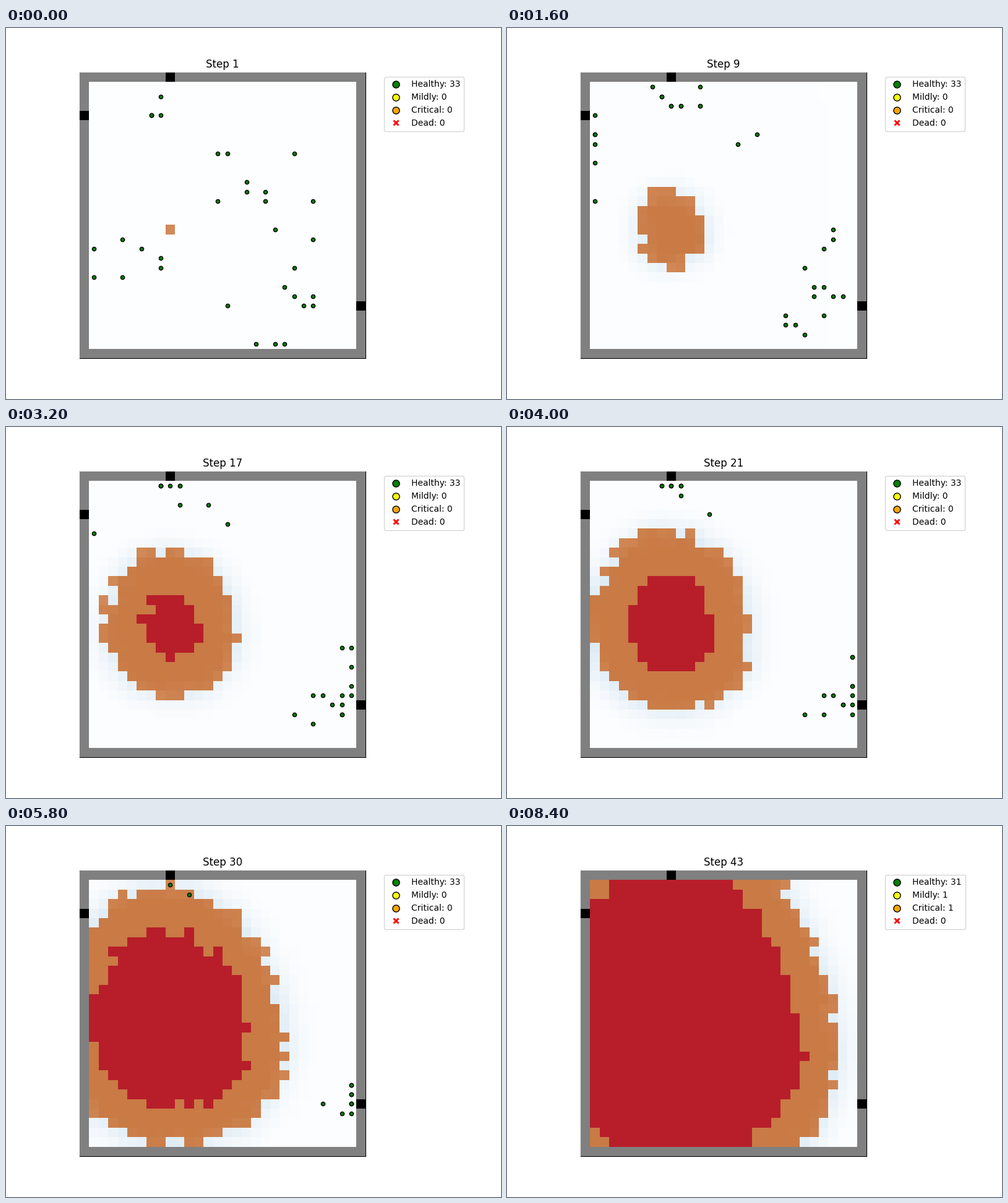
These frames come from a looping animation (800x600 px, 8.6 s). A matplotlib script:

```python
import numpy as np
import matplotlib.pyplot as plt
from matplotlib.animation import FuncAnimation
from matplotlib.lines import Line2D

STEPS, SIZE, BURN_TIME = 43, 30, 9.5
IGNITION = np.array((9, 16))
GATES = np.array([(9, 0), (0, 4), (29, 24)])
COLORS = {"Healthy": "green", "Mildly": "yellow", "Critical": "orange", "Dead": "red"}
EMBER, EMBER_EDGE, BURNT = (201, 122, 69), (210, 138, 88), (183, 30, 42)
CLEAR, SMOKE = (253, 254, 255), (208, 227, 241)

# Where people start: how many, around which cell, how widely spread.
CROWDS = [(5, (8, 3), 1.5), (10, (19, 11), 4), (7, (5, 19), 2.5), (11, (22, 24), 3.5)]

rng = np.random.default_rng(4)


def arrival_times():
    """Step at which each cell catches fire; the front's speed varies by direction."""
    rows, cols = np.mgrid[:SIZE, :SIZE]
    dx, dy = cols - IGNITION[0], rows - IGNITION[1]
    a = np.arctan2(dy, dx)
    speed = (0.428 - 0.03 * np.sin(a) - 0.029 * np.cos(2 * a + 0.5)
             + 0.017 * np.sin(3 * a))
    dist = np.hypot(dx, dy)
    ragged = rng.uniform(-1.4, 1.4, dist.shape)
    times = 1 + np.where(dist > 0, np.maximum((dist - 0.4) / speed + ragged, 1), 0)
    times[[0, -1]] = times[:, [0, -1]] = np.inf
    return times


def blur(field):
    p = np.pad(field, 1, mode="edge")
    return sum(p[i:i + SIZE, j:j + SIZE] for i in range(3) for j in range(3)) / 9


def mix(low, high, amount):
    low, high = np.array(low) / 255, np.array(high) / 255
    return low + (high - low) * np.clip(amount, 0, 1)[..., None]


def render_floors():
    """One RGB grid per step: smoke halo, burning and burnt cells, walls, gates."""
    times = arrival_times()
    grain = rng.uniform(-0.2, 0.2, times.shape)
    smoke = np.zeros_like(times)
    floors = []
    for step in range(1, STEPS + 1):
        lit, burnt = times <= step, times + BURN_TIME <= step
        floor = mix(CLEAR, SMOKE, smoke)
        floor[lit] = mix(EMBER_EDGE, EMBER, 1.5 * smoke - 0.3 + grain)[lit]
        floor[burnt] = np.array(BURNT) / 255
        floor[[0, -1]] = floor[:, [0, -1]] = 128 / 255
        floor[GATES[:, 1], GATES[:, 0]] = 0
        floors.append(floor)
        smoke[lit] = 1
        near = blur(smoke)
        smoke = (near + blur(near)) / 2
    return floors


def plan_paths():
    """Cells per step for everyone; those nearest the fire leave first."""
    starts = np.concatenate([rng.normal(c, s, (n, 2)) for n, c, s in CROWDS])
    starts = np.clip(np.rint(starts), 1, SIZE - 2)
    starts = starts[np.argsort(np.hypot(*(starts - IGNITION).T))]
    paths = []
    for start, leave in zip(starts, np.linspace(8, STEPS, len(starts))):
        gate = GATES[np.argmin(np.hypot(*(GATES - start).T))]
        u = (np.arange(1, np.ceil(leave)) - 1) / (leave - 1)
        u = u[:, None]
        sway = rng.normal(0, 1.5, 2) * np.sin(np.pi * u)
        route = start + (gate - start) * u ** 0.8 + sway
        paths.append(np.clip(np.rint(route), 1, SIZE - 2))
    return paths


def condition(person, step):
    """The last two to leave are caught by the smoke."""
    if person < len(paths) - 2 or step < 39:
        return "Healthy"
    return "Critical" if person == len(paths) - 1 and step >= 41 else "Mildly"


floors = render_floors()
paths = plan_paths()

fig, ax = plt.subplots(figsize=(8, 6), dpi=100)
fig.subplots_adjust(left=0.125, right=0.75, bottom=0.11, top=0.88)
image = ax.imshow(floors[0], interpolation="nearest", zorder=3)
dots = {name: ax.scatter([], [], s=20, c=color, edgecolors="black", linewidths=1, zorder=4)
        for name, color in COLORS.items() if name != "Dead"}
ax.set(xticks=[], yticks=[])
title = ax.set_title("Step 1")

handles = [
    Line2D([0], [0], marker="X" if name == "Dead" else "o", color="w", markersize=8,
           markerfacecolor=color, markeredgecolor="w" if name == "Dead" else "black",
           label=f"{name}: 0")
    for name, color in COLORS.items()
]
legend = ax.legend(handles=handles, loc="upper left", bbox_to_anchor=(1.05, 1))


def update(frame):
    step = frame + 1
    states = [condition(i, step) for i in range(len(paths))]
    image.set_data(floors[frame])
    for name, group in dots.items():
        cells = [p[frame] for p, s in zip(paths, states) if s == name and frame < len(p)]
        group.set_offsets(np.reshape(cells, (-1, 2)))
    title.set_text(f"Step {step}")
    for text, name in zip(legend.get_texts(), COLORS):
        text.set_text(f"{name}: {states.count(name)}")
    return image, title, legend, *dots.values()


anim = FuncAnimation(fig, update, frames=STEPS, interval=200, repeat=True,
                     repeat_delay=0, blit=False)
plt.show()
```
